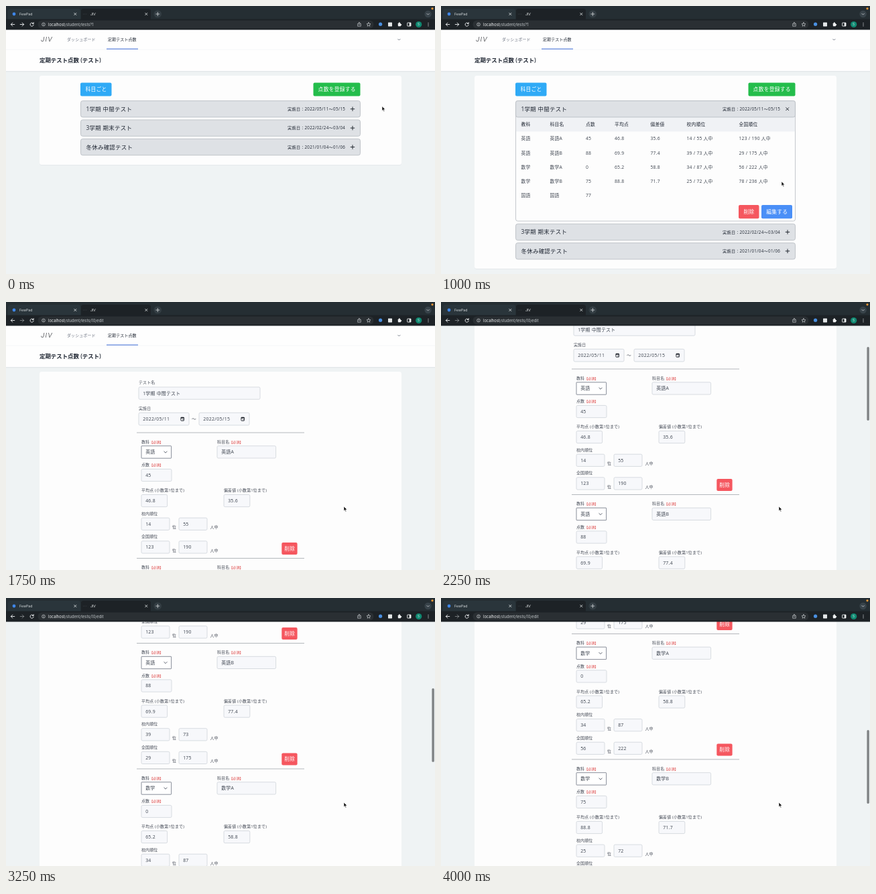
These frames come from a looping animation (640x400 px, 4250 ms). An HTML page:

```html
<!DOCTYPE html>
<html lang="ja">
<head>
<meta charset="utf-8">
<title>定期テスト点数</title>
<style>
  html, body { margin: 0; width: 100%; height: 100%; overflow: hidden; background: #eff3f4; }
  svg { display: block; width: 640px; height: 400px; }
  text { font-family: "Open Sans", "Noto Sans CJK JP", "Noto Sans CJK", sans-serif; white-space: pre; }
  .ui { font-family: Inter, Roboto, "Noto Sans CJK JP", sans-serif; }
</style>
</head>
<body>
<svg id="stage" viewBox="0 0 640 400" xmlns="http://www.w3.org/2000/svg"></svg>
<script>
const STEP = 250, LOOP = 4250;
const BRAND = 'JIV';
const INK = '#1f2632', BODY = '#3d444f', LABEL = '#434955', EDGE = '#b5bac1';

// Drawing helpers; text is centred vertically on y.
const rect = (x, y, x2, y2, fill, r = 0, stroke = 'none', w = 0.8) =>
  `<rect x="${x}" y="${y}" width="${x2 - x}" height="${y2 - y}" rx="${r}" fill="${fill}" stroke="${stroke}" stroke-width="${w}"/>`;
const path = (d, stroke, w = 1, fill = 'none') =>
  `<path d="${d}" fill="${fill}" stroke="${stroke}" stroke-width="${w}" stroke-linecap="round" stroke-linejoin="round"/>`;
const dot = (x, y, r, fill, stroke = 'none', w = 0.8) =>
  `<circle cx="${x}" cy="${y}" r="${r}" fill="${fill}" stroke="${stroke}" stroke-width="${w}"/>`;
const text = (x, y, s, size, fill = BODY, extra = '', ls = 0.035 * size) =>
  `<text x="${x}" y="${y + 0.36 * size}" font-size="${size}" fill="${fill}" letter-spacing="${ls}" ${extra}>${s}</text>`;
const group = (id, inner) => `<g id="${id}">${inner}</g>`;
const button = (x, y, x2, y2, fill, label, id = '') =>
  `<g ${id && `id="${id}"`} fill="${fill}">` + rect(x, y, x2, y2, 'inherit', 2) +
  text((x + x2) / 2 + 0.2, (y + y2) / 2 - 0.1, label, 7.75, '#fff', 'text-anchor="middle"') + '</g>';

function header() {
  return rect(0, 30, 640, 97, '#fefefe') +
    rect(0, 64.8, 640, 65.3, '#eceef1') +
    rect(0, 97, 640, 97.8, '#dde1e4') + rect(0, 97.8, 640, 98.6, '#e9edef') +
    text(52, 50, BRAND, 9.6, '#2f3136', 'class="ui" font-weight="300" font-style="italic"', 1.1) +
    text(91, 50, 'ダッシュボード', 5.9, '#6b7280') +
    text(152, 50, '定期テスト点数', 5.9, INK) +
    rect(150, 63.5, 197, 64.7, '#5a80dc') +
    path('M584.8 49.4l1.6 1.6 1.6-1.6', '#6b7280', 0.9) +
    text(50, 80.5, '定期テスト点数 (テスト)', 8.44, INK, 'font-weight="600"', 0);
}

const card = bottom =>
  rect(50, 104.6, 590, bottom + 0.7, '#e2e6e9', 3) + rect(50, 104, 590, bottom, '#fdfdfd', 3);

const exams = [
  ['1学期 中間テスト', '2022/05/11〜05/15'],
  ['3学期 期末テスト', '2022/02/24〜03/04'],
  ['冬休み確認テスト', '2021/01/04〜01/06']
];
function examRow(i, y, open) {
  const [name, date] = exams[i], c = y + 12.2;
  const icon = open ? `M514.7 ${c - 2}l4 4m0-4l-4 4` : `M514.2 ${c}h5.6m-2.8-2.8v5.6`;
  return rect(111.5, y, 528.5, y + 24.4, '#dee1e5', 3, EDGE) +
    text(119.5, c, name, 8.44, INK) +
    text(420, c, '実施日 : ' + date, 6.2, INK, '', 0.33) +
    path(icon, '#1d222b', 0.95);
}

const topButtons =
  button(111, 114.5, 157.5, 134.5, '#2faaf6', '科目ごと') +
  button(458.5, 114.5, 528.5, 134.5, '#24bd4b', '点数を登録する');

const columns = [119.5, 162.5, 216, 259, 312.5, 366.5, 444.5];
// subject, name, score, average, deviation, school rank, school size, national rank, national size
const scores = [
  ['英語', '英語A', 45, 46.8, 35.6, 14, 55, 123, 190],
  ['英語', '英語B', 88, 69.9, 77.4, 39, 73, 29, 175],
  ['数学', '数学A', 0, 65.2, 58.8, 34, 87, 56, 222],
  ['数学', '数学B', 75, 88.8, 71.7, 25, 72, 78, 236],
  ['国語', '国語', 77]
];

function closedList() {
  return card(237) + topButtons + exams.map((_, i) => examRow(i, 141.5 + i * 28.4)).join('');
}

function openList() {
  const cells = (row, y, color, extra) =>
    row.map((s, i) => text(columns[i], y, s, 6.75, color, extra)).join('');
  const rows = scores.map((s, i) => {
    const row = s.slice(0, 5);
    if (s.length > 5) row.push(`${s[5]} / ${s[6]} 人中`, `${s[7]} / ${s[8]} 人中`);
    return cells(row, 198 + i * 21.25, BODY);
  }).join('');
  return card(392) + topButtons +
    rect(111.5, 141.5, 528.5, 321, '#fdfdfd', 3, EDGE) +
    rect(111.9, 166, 528.1, 187.4, '#f0f2f5') +
    examRow(0, 141.5, true) +
    cells(['教科', '科目名', '点数', '平均点', '偏差値', '校内順位', '全国順位'], 176.6, INK, 'font-weight="500"') +
    rows +
    button(444, 297, 474.5, 317.3, '#f5575f', '削除') +
    button(478, 297, 524, 317.3, '#4a8ff7', '編集する', 'edit') +
    examRow(1, 325.2) + examRow(2, 353.6);
}

const field = (x, y, x2, value, h = 18.2, stroke = '#cfd3da') =>
  rect(x, y, x2, y + h, '#f7f8fb', 1.8, stroke) + text(x + 6.2, y + h / 2, value, 6.9);
const label = (x, y, s, required) => text(x, y, s + (required
  ? '<tspan font-size="5.06" fill="#dc3d3d" letter-spacing="0" font-weight="500">【必須】</tspan>' : ''), 5.9, LABEL);

function dateField(x, value) {
  const c = x + 65.2;
  return rect(x, 165.3, x + 75, 183.9, '#f7f8fb', 1.8, '#cfd3da') +
    text(x + 6.2, 174.7, value, 6.9, BODY, '', 0.35) +
    rect(c - 2.3, 172.2, c + 2.3, 177.2, 'none', 0.5, '#22262e', 0.9) +
    rect(c - 2.3, 172, c + 2.3, 173.7, '#22262e') + rect(c + 0.2, 175, c + 1.4, 176.2, '#22262e');
}

function block(s, i) {
  const rank = (y, name, a, b) =>
    label(202, y, name) + field(202, y + 6.6, 244, a) + field(258, y + 6.6, 300, b) +
    text(248, y + 20.4, '位', 5.9, LABEL) + text(304.5, y + 20.4, '人中', 5.9, LABEL);
  return `<g transform="translate(0 ${195 + i * 187.5})">` +
    rect(195, -0.4, 445, 0.4, '#a3a7ac') +
    label(202, 13.5, '教科', true) +
    rect(202, 19.8, 246.6, 38.2, '#fff', 0.6, '#6b7280') + text(208.2, 29, s[0], 6.9) +
    path('M235.8 28l2.2 2.2 2.2-2.2', '#4b5260', 0.9) +
    label(315, 13.5, '科目名', true) + field(315, 19.8, 402.6, s[1]) +
    label(202, 48, '点数', true) + field(202, 54.4, 247, s[2]) +
    label(202, 86, '平均点 (小数第1位まで)') + field(202, 92.5, 240.6, s[3]) +
    label(325, 86, '偏差値 (小数第1位まで)') + field(325, 92.5, 363.8, s[4]) +
    rank(120.6, '校内順位', s[5], s[6]) + rank(155.2, '全国順位', s[7], s[8]) +
    button(411.3, 164, 434.6, 182, '#f5575f', '削除') + '</g>';
}

function form() {
  return header() + card(1200) +
    label(198, 120, 'テスト名') + field(198, 127, 379, exams[0][0]) +
    label(198, 159, '実施日') + dateField(198, '2022/05/11') + dateField(288, '2022/05/15') +
    text(277, 174.5, '〜', 6.75) +
    scores.slice(0, 4).map(block).join('');
}

function browser() {
  const grey = '#c9cdd0';
  return rect(0, 0, 640, 20, '#252e33') +
    rect(3, 4, 111, 24, '#2a353b', 3.5) + rect(112, 4, 216, 24, '#1d2226', 3.5) +
    rect(0, 19.6, 640, 35.5, '#1d2226') +
    dot(12, 12, 2.4, '#3f86e8') + text(20, 12, 'FewPad', 5.2, '#d3d8da', 'class="ui"', 0) +
    [115.5, 117.7, 119.9].map(x => dot(x, 12, 0.4, '#596064')).join('') +
    text(126, 12, BRAND, 5.2, '#eceff0', 'class="ui"', 0) +
    [103.3, 209.3].map(x => path(`M${x - 1.6} 10.4l3.2 3.2m0-3.2l-3.2 3.2`, '#e3e6e8', 0.8)).join('') +
    dot(226.3, 12, 5.8, '#333d43') + path('M223.8 12h5m-2.5-2.5v5', grey, 0.9) +
    dot(629.6, 12, 5.2, '#38434a') + path('M627.8 11.3l1.8 1.8 1.8-1.8', grey, 0.8) +
    dot(636, 3.8, 1.6, '#f29a38') +
    rect(47.5, 21.6, 548.5, 33.4, '#2a2f33', 6) +
    path('M12.8 27.5H7.4m2.4-2.5l-2.5 2.5 2.5 2.5', '#e8eaec', 0.95) +
    group('forward', path('M21.2 27.5h5.4m-2.4-2.5l2.5 2.5-2.5 2.5', '#e8eaec', 0.95)) +
    group('reload', path('M40.7 26a2.6 2.6 0 1 0 .5 2.2M41.2 24.6v1.9h-1.9', '#e8eaec', 0.95)) +
    group('stop', path('M36.4 25.3l4.4 4.4m0-4.4l-4.4 4.4', '#e8eaec', 0.95)) +
    dot(56, 27.5, 2.4, 'none', grey, 0.7) + path('M56 27.4v1.2M56 26.2v.1', grey, 0.7) +
    text(63, 27.5, 'localhost<tspan id="route" fill="#c3c8cb"></tspan>', 5.75, '#f2f4f5', 'class="ui"', 0) +
    path('M525.8 26.4h-1.1v3.8h4.6v-3.8h-1.1M527 28.4v-4m-1.2 1.1l1.2-1.2 1.2 1.2', grey, 0.7) +
    path('M541 24.5l.9 2 2.1.2-1.6 1.4.5 2.1-1.9-1.1-1.9 1.1.5-2.1-1.6-1.4 2.1-.2z', grey, 0.7) +
    dot(558.6, 27.2, 2.6, '#4a90e2') + rect(570, 24.4, 576, 30.4, '#e4e7e8', 0.6) +
    rect(584.8, 25.8, 589, 30.2, '#eef0f1', 0.4) + dot(586.8, 25.4, 1.1, '#eef0f1') + dot(589.2, 28, 1.1, '#eef0f1') +
    rect(598.7, 25, 604, 30, 'none', 0.4, '#eef0f1', 0.9) + rect(601.7, 25, 604, 30, '#eef0f1') +
    dot(615.7, 27.5, 4.6, '#108a72') +
    text(615.7, 27.5, 'S', 5, '#d9ece8', 'class="ui" text-anchor="middle"', 0) +
    [25.3, 27.5, 29.7].map(y => dot(630, y, 0.65, grey)).join('');
}

const arrow = path('M0 0v6.6l1.5-1.4 1.1 2.5 1.1-.5-1.1-2.4h2.1z', '#fff', 0.6, '#0c0c0c');
const hand = path('M-1.6 .6v-3.5q.7-.9 1.3 0v2.2q2.6-.3 3.8 1v2.2l-.8 1.7h-3.2L-3 1.5q0-1 1.4-.3z', '#111', 0.7, '#fff');

const stage = document.getElementById('stage');
stage.innerHTML = rect(0, 0, 640, 400, '#eff3f4') +
  group('list', header() + group('closed', closedList()) + group('open', openList())) +
  group('form', form()) +
  group('thumb', rect(635.4, 37.7, 638.8, 147.7, '#7f8284', 1.7)) +
  browser() + group('arrow', arrow) + group('hand', hand);

const parts = {};
stage.querySelectorAll('[id]').forEach(el => parts[el.id] = el);
const show = (id, on) => parts[id].setAttribute('display', on ? 'inline' : 'none');
const move = (id, x, y) => parts[id].setAttribute('transform', `translate(${x} ${y})`);

const pointer = [
  ['arrow', 561, 149.8], ['hand', 520.5, 155.5], ['hand', 520.5, 155.5], ['arrow', 515, 190],
  ['arrow', 508, 262], ['hand', 504.3, 309], ['hand', 504.3, 309], ['arrow', 504, 305.2]
];
const scrolls = [0, 75, 95, 145, 195, 255, 315, 375.2, 447, 516.6];
const OPEN_AT = 2, HOVER_AT = 5, LOAD_AT = 6, FORM_AT = 7;

function draw(n) {
  const editing = n >= FORM_AT;
  const scroll = editing ? scrolls[n - FORM_AT] : 0;
  const [kind, x, y] = pointer[Math.min(n, FORM_AT)];
  show('list', !editing);
  show('closed', n < OPEN_AT);
  show('open', n >= OPEN_AT);
  show('form', editing);
  move('form', 0, -scroll);
  show('thumb', scroll > 0);
  move('thumb', 0, scroll * 0.3084);
  show('reload', n !== LOAD_AT);
  show('stop', n === LOAD_AT);
  parts.forward.setAttribute('opacity', editing ? 0.45 : 1);
  parts.route.textContent = editing ? '/student/tests/10/edit' : '/student/tests?1';
  parts.edit.setAttribute('fill', n >= LOAD_AT ? '#2a64ee' : n >= HOVER_AT ? '#3478f2' : '#4a8ff7');
  show('arrow', kind === 'arrow');
  show('hand', kind === 'hand');
  move(kind, x, y);
}

function tick() {
  draw(Math.floor(performance.now() % LOOP / STEP));
  requestAnimationFrame(tick);
}
tick();
</script>
</body>
</html>
```
